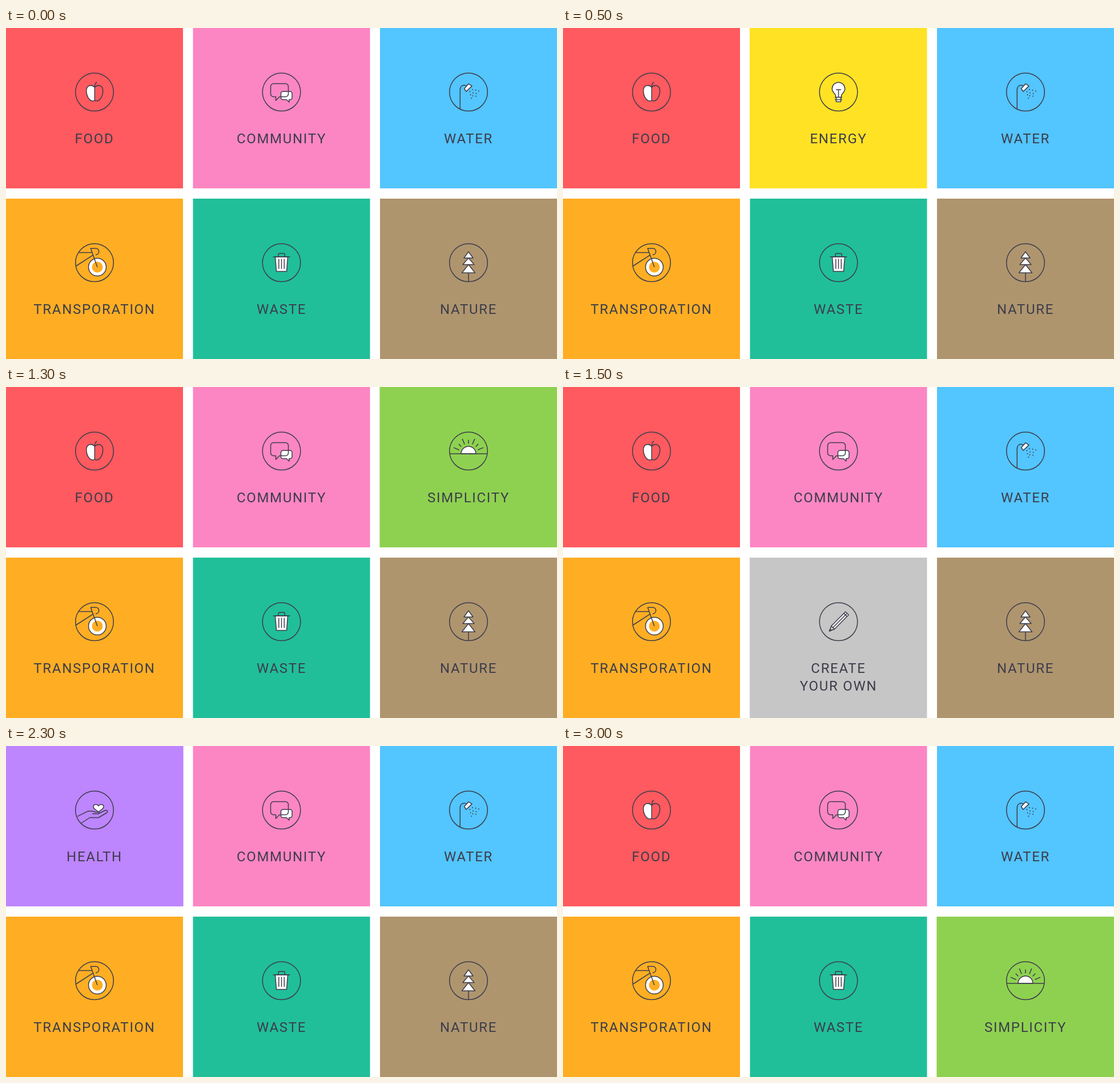
These frames come from a looping animation (965x580 px, 3500 ms). An HTML page:

```html
<!DOCTYPE html>
<html lang="en">
<head>
<meta charset="utf-8">
<title>Topic tiles</title>
<style>
  html, body { margin: 0; width: 100%; height: 100%; overflow: hidden; background: #fff; }
  svg { display: block; width: 965px; height: 580px; }
  .icon { fill: none; stroke: #3d3d4b; stroke-width: 1.5; stroke-linejoin: round; }
  .icon .w { fill: #fff; }
  .icon .dots { stroke-width: 1.9; stroke-linecap: round; }
  text { font: 24px Roboto, sans-serif; letter-spacing: 1.7px; fill: #3d3d4b; text-anchor: middle; }
</style>
</head>
<body>
<svg id="stage" viewBox="0 0 965 580" xmlns="http://www.w3.org/2000/svg"></svg>
<script>
const path = (d, cls = '') => `<path class="${cls}" d="${d}"/>`;
const circle = (x, y, r, attrs = '') => `<circle cx="${x}" cy="${y}" r="${r}" ${attrs}/>`;

const rays = () => {
  let d = '';
  for (let i = -3; i <= 3; i++) {
    const a = i * Math.PI / 8, far = i % 2 ? 28.3 : 24.5;
    const at = r => `${(155 + r * Math.sin(a)).toFixed(2)} ${(117 - r * Math.cos(a)).toFixed(2)}`;
    d += `M${at(17.8)}L${at(far)}`;
  }
  return path(d);
};

const drops = [[162, 108], [157.5, 111.5], [167.5, 109], [173, 110.5], [163, 113.8],
  [168.5, 114.8], [158.5, 117], [162.5, 118.8], [168, 119.5], [160.3, 123]];

const tiles = {
  food: { color: '#ff5a5f', label: ['FOOD'], icon:
    path('M155.3 104C150.5 98.5 140.8 99.5 140.8 110C140.8 119 146 127.8 151.8 127.8C153.4 127.8 154.5 127.4 155.3 126.8Z', 'w') +
    path('M155.3 104C160 98.5 169.7 99.5 169.7 110C169.7 119 164.5 127.8 158.8 127.8C157.2 127.8 156.1 127.4 155.3 126.8M155.3 104C155.3 99 156.3 96 159.3 95') },

  community: { color: '#fc86c3', label: ['COMMUNITY'], icon:
    path('M158 111.3H170A3.5 3.5 0 0 1 173.5 114.8V122A3.5 3.5 0 0 1 170 125.5H168.3V130L163.8 125.5H157.5A3.5 3.5 0 0 1 154 122V114.8A3.5 3.5 0 0 1 157.5 111.3Z', 'w') +
    path('M141 97.5H162A5 5 0 0 1 167 102.5V115.5A5 5 0 0 1 162 120.5H151.5L145 127V120.5H141A5 5 0 0 1 136 115.5V102.5A5 5 0 0 1 141 97.5Z') },

  water: { color: '#53c5ff', label: ['WATER'], icon:
    path('M140.3 141.8V108.5C140.3 103 143.5 100.3 147.5 100.3C149.5 100.3 151 101 151.8 102') +
    path('M147.6 106.3L155.2 97.8L161 101.6L151 111.2Z', 'w') +
    path(drops.map(p => `M${p}h.01`).join(''), 'dots') },

  transport: { color: '#ffae23', label: ['TRANSPORATION'], icon:
    circle(160, 120, 15.5, 'class="w"') +
    circle(160, 120, 9.5, 'fill="#ffae23" stroke="none"') +
    path('M160 120L148.3 87.3H157.5C164.5 87.3 164.5 98 157 98.5M127.5 94.5H151M122.8 118L152.5 98.8') },

  waste: { color: '#20bf99', label: ['WASTE'], icon:
    path('M144 102L146 127.5H164L166 102Z', 'w') +
    path('M140 102H170M149.5 102V98A2 2 0 0 1 151.5 96H158.8A2 2 0 0 1 160.8 98V102M150.3 105.5V123M155 105.5V123M159.8 105.5V123') },

  nature: { color: '#af956e', label: ['NATURE'], icon:
    path('M155 93L163 104H147ZM155 104L165 115.5H145ZM155 115.5L166.5 130H143.5Z', 'w') +
    path('M155 130V145.5') },

  energy: { color: '#ffe224', label: ['ENERGY'], icon:
    path('M150 121.5V118.5C150 115 143.8 113 143.8 106.5A11.2 11.2 0 0 1 166.2 106.5C166.2 113 160 115 160 118.5V121.5Z', 'w') +
    path('M151 121.5V129.3H159V121.5', 'w') +
    path('M148.5 121.5H161.5M148.5 125.4H161.5M150.5 108H159.5M155 108V121.5') },

  simplicity: { color: '#8ed150', label: ['SIMPLICITY'], icon:
    path('M142 117A13 13 0 0 1 168 117Z', 'w') + path('M122 117H188') + rays() },

  create: { color: '#c6c6c6', label: ['CREATE', 'YOUR OWN'], icon:
    path('M142.5 119.7L167.2 94.7L172.7 100.2L148 125.2Z', 'w') +
    path('M142.5 119.7L139 128.7L148 125.2M145.2 122.5L170 97.5M164.3 97.6L169.8 103.1') +
    path('M139 128.7L140.3 125.4L142.3 127.4Z') },

  health: { color: '#bd85fe', label: ['HEALTH'], icon:
    path('M125 123.3L143.3 114.3H151C154.5 114.3 155 116 158 116H161C164.3 116 164.3 118.8 161 118.8H151M163.5 117.8L173.5 113C177 111.5 179.3 115 176.5 117L162 125.5H146.5L131.5 135.5') +
    path('M162 115.5C158 112.5 153 110 153 106.5C153 102 159.5 101 162 105C164.5 101 171 102 171 106.5C171 110 166 112.5 162 115.5Z', 'w') }
};

// Column offset, plus left edge and width of the panel when a tile is swapped in
const columns = [
  { x: 0, left: 0, width: 310.6 },
  { x: 327.5, left: -0.5, width: 310.5 },
  { x: 655, left: -0.6, width: 310.6 }
];

function tile(name, slot, swapped) {
  const { color, label, icon } = tiles[name];
  const col = columns[slot % 3];
  const left = swapped ? col.left : 0, width = swapped ? col.width : 310;
  const lines = label.map((s, i) => `<text x="155" y="${202 + 31 * i}">${s}</text>`).join('');
  return `<g transform="translate(${col.x} ${slot < 3 ? 0 : 299})">
    <rect x="${left}" width="${width}" height="281" fill="${color}"/>
    <g class="icon">${circle(155, 112.3, 33.3)}${icon}</g>${lines}</g>`;
}

const base = ['food', 'community', 'water', 'transport', 'waste', 'nature'];
const swaps = [null, [1, 'energy'], [2, 'simplicity'], [4, 'create'],
  [0, 'health'], [3, 'health'], [5, 'simplicity']];
const STEP = 500;

const stage = document.getElementById('stage');
stage.innerHTML = base.map((name, slot) => tile(name, slot, false)).join('') +
  swaps.filter(Boolean).map(([slot, name]) => tile(name, slot, true)).join('');
const groups = [...stage.children];
const normal = groups.slice(0, 6), swapped = groups.slice(6);

let shown = -1;
function show(step) {
  if (step === shown) return;
  shown = step;
  const slot = swaps[step] ? swaps[step][0] : -1;
  normal.forEach((g, i) => { g.style.display = i === slot ? 'none' : ''; });
  swapped.forEach((g, i) => { g.style.display = i + 1 === step ? '' : 'none'; });
}

show(0);
const start = performance.now();
function tick() {
  const t = Math.max(0, performance.now() - start);
  show(Math.floor(t / STEP) % swaps.length);
  requestAnimationFrame(tick);
}
requestAnimationFrame(tick);
</script>
</body>
</html>
```
